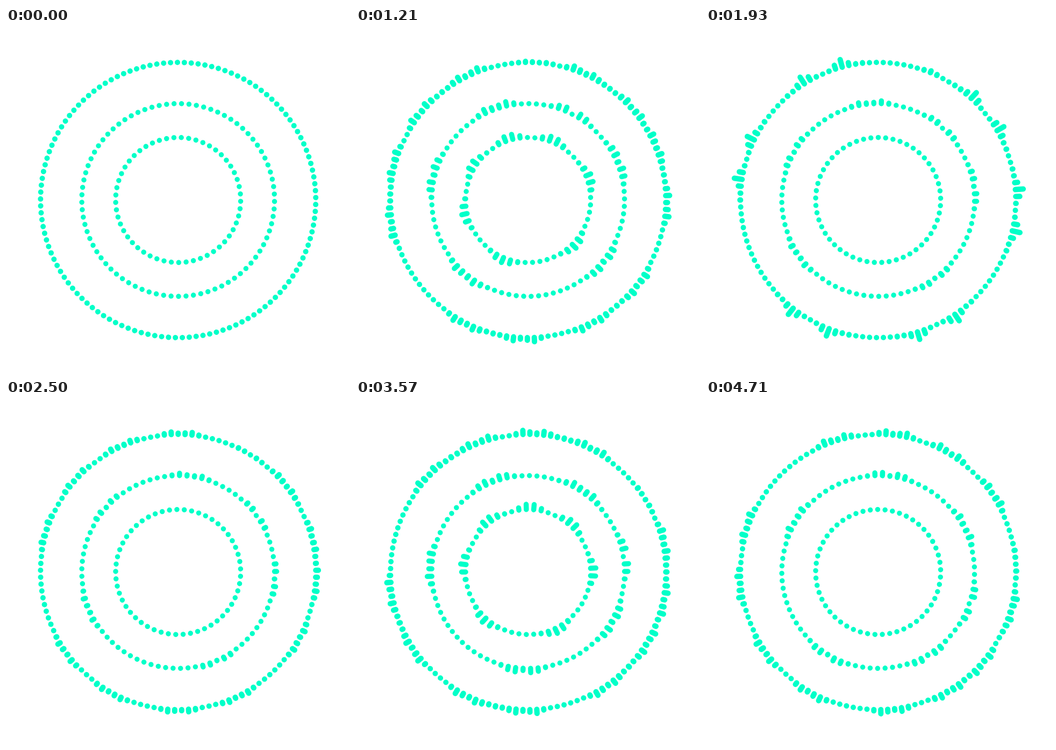
Animation, 640 px wide and 640 px high, one loop 4.78 s. Source, as an HTML page:

```html
<!DOCTYPE html>
<html lang="en">
<head>
<meta charset="utf-8">
<title>Pulsing rings</title>
<style>
  html, body { margin: 0; width: 100%; height: 100%; overflow: hidden; background: #fff; }
  svg { display: block; width: 100vw; height: 100vh; }
  line { stroke: #00ffc8; stroke-linecap: round; }
</style>
</head>
<body>
<svg id="stage" viewBox="0 0 640 640"></svg>
<script>
const LOOP = 4780, STEPS = 67, STEP = LOOP / STEPS;
const BEAT = 2360, TURN = 2390;
const CX = 320.3, CY = 320;

const clamp = x => Math.max(0, Math.min(1, x));
const plateau = (t, mid, half) => Math.exp(-(((t - mid) / half) ** 6));

// peaks: bars that get plucked; lift: their height over one beat;
// near, far: heights of the ripples left on both sides of a peak
const rings = [
  {
    r: 256, n: 125, stroke: 10, phase: -0.3, speed: 20.7,
    peaks: [4, 19, 40, 59, 86, 103], weak: 122,
    width: 2, power: 1.2, offset: 2.9, near: 7, swell: 9, far: 8,
    lift: t => 59 * (plateau(t, 475, 160) + plateau(t, 890, 260))
  },
  {
    r: 179.3, n: 81, stroke: 9.5, phase: 2, speed: 20.7,
    peaks: [0, 9, 23, 43.4, 58, 70.5], still: 0,
    width: 2.3, power: 1.5, offset: 1.4, near: 7, swell: -2, far: 0,
    lift: t => 19 * plateau(t, 740, 420)
  },
  {
    r: 116.3, n: 53, stroke: 9.5, phase: -3.9, speed: -8.5,
    peaks: [5.5, 12.4, 21.8, 32, 40, 46.6, 52.5],
    width: 1.6, power: 2.5, offset: 1, near: 0, swell: 0, far: 0,
    lift: t => 10.5 * plateau(t, 880, 580)
  }
];
const FAST = 24.9;

const stage = document.getElementById("stage");
for (const ring of rings) {
  ring.bars = Array.from({ length: ring.n }, () => {
    const bar = document.createElementNS("http://www.w3.org/2000/svg", "line");
    bar.setAttribute("stroke-width", ring.stroke);
    return stage.appendChild(bar);
  });
}

// shortest distance between two bars around the ring
function gap(a, b, n) {
  const d = Math.abs(a - b) % n;
  return Math.min(d, n - d);
}

// height at d bars from a peak
function profile(ring, t, carry) {
  const swing = Math.cos(Math.PI * (t - 1210) / 1150) ** 2;
  const rest = Math.max(clamp((t - 1100) / 110), carry);
  const lift = ring.lift(t);
  const near = rest * (ring.near + ring.swell * (1 - swing));
  const far = rest * ring.far * swing;
  const bump = x => Math.exp(-((x / 1.1) ** 2));
  return d => lift * Math.exp(-((d / ring.width) ** ring.power))
    + near * bump(d - ring.offset) + far * bump(d - 2 * ring.offset);
}

function height(ring, i, shape) {
  if (i === ring.still) return 0;
  const at = p => shape(gap(i, p, ring.n));
  let h = Math.max(...ring.peaks.map(at));
  if (ring.weak) h = Math.max(h, at(ring.weak) / 4);
  return h < 0.6 ? 0 : h;
}

function draw(time) {
  const t = time % BEAT;
  const carry = time > BEAT ? clamp(1 - t / 400) : 0;
  for (const ring of rings) {
    const shape = profile(ring, t, carry);
    const turn = ring.phase
      + (Math.min(time, TURN) * ring.speed + Math.max(0, time - TURN) * FAST) / 1000;
    ring.bars.forEach((bar, i) => {
      const a = (turn + i * 360 / ring.n) * Math.PI / 180;
      const sx = Math.sin(a), sy = -Math.cos(a);
      const end = ring.r + height(ring, i, shape) + 0.01;
      bar.setAttribute("x1", CX + sx * ring.r);
      bar.setAttribute("y1", CY + sy * ring.r);
      bar.setAttribute("x2", CX + sx * end);
      bar.setAttribute("y2", CY + sy * end);
    });
  }
}

const start = performance.now();
function tick() {
  const t = (performance.now() - start) % LOOP;
  const k = Math.min(STEPS - 1, Math.floor(t / STEP + 0.15));
  // the last two steps already belong to the fading second beat
  draw(Math.min(k * STEP, 2 * BEAT - 1));
  requestAnimationFrame(tick);
}
tick();
</script>
</body>
</html>
```
